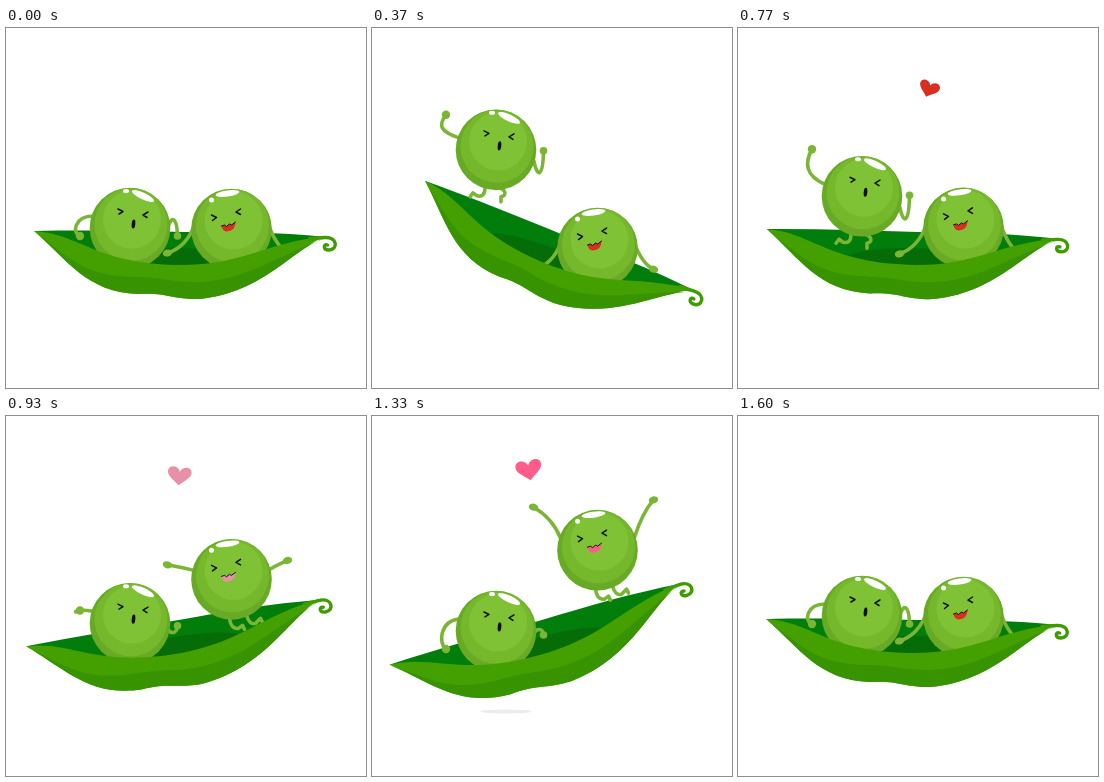
An HTML page that plays this animation: 360 by 360 pixels, repeating every 1.63 s.

```html
<!DOCTYPE html>
<html lang="en">
<head>
<meta charset="utf-8">
<title>Two peas on a seesaw pod</title>
<style>
  html, body { margin: 0; height: 100%; overflow: hidden; background: #fff; }
  svg { display: block; width: 100%; height: 100%; }
  .limb { fill: none; stroke: #7ab536; stroke-width: 3.6; stroke-linecap: round; stroke-linejoin: round; }
  .hand { fill: #7ab536; }
  .eye { fill: none; stroke: #111; stroke-width: 1.5; stroke-linecap: round; stroke-linejoin: round; }
</style>
</head>
<body>
<svg viewBox="0 0 360 360">
  <defs>
    <g id="ball">
      <circle r="40.3" fill="#68aa25"/>
      <circle cx="1" cy="-3.5" r="36.5" fill="#76b82b"/>
      <circle cx="2" cy="-8.5" r="29" fill="#80c235"/>
    </g>
  </defs>

  <ellipse id="shadow" cx="134" cy="295.5" rx="26" ry="2" fill="#ececec"/>

  <g class="pod">
    <path fill="#007d0a" d="M28 203C80 202 130 203 180 204C230 204 270 204 320 209L262 222Q180 250 90 226Z"/>
    <ellipse cx="172" cy="234" rx="68" ry="14" fill="#056c08"/>
  </g>

  <g id="left">
    <path class="limb" d="M-11 38Q-11 48 -19 46L-23 43L-26 47M3 38C10 40 11 46 5 47L5 52"/>
    <path class="limb arm"/><path class="limb arm"/>
    <circle class="hand" r="4.2"/><circle class="hand" r="3.8"/>
    <use href="#ball"/>
    <ellipse cx="-4" cy="-37" rx="3" ry="2" fill="#fff"/>
    <ellipse cx="13" cy="-32" rx="12" ry="3.4" fill="#fff" transform="rotate(25 13 -32)"/>
    <path class="eye" d="M-12 -19L-7 -16.5L-11 -14M18 -16L13 -13L17 -10.5"/>
    <ellipse cx="3.5" cy="-4" rx="1.8" ry="4.6" fill="#111" transform="rotate(6 3.5 -4)"/>
  </g>

  <g id="right">
    <path class="limb" d="M-2 38Q-1 50 7 49L11 46L13 50M15 36Q18 46 24 44L29 39L31 43"/>
    <path class="limb arm"/><path class="limb arm"/>
    <ellipse class="hand" rx="4.8" ry="3.5"/><ellipse class="hand" rx="4.8" ry="3.5"/>
    <use href="#ball"/>
    <circle cx="-20" cy="-29" r="2.5" fill="#fff"/>
    <ellipse cx="-4" cy="-35.5" rx="12" ry="3" fill="#fff" transform="rotate(-8 -4 -35.5)"/>
    <path class="eye" d="M-20 -14L-15 -11.5L-19 -8.5M9 -20L4.5 -17L9 -14.5"/>
    <path class="love" d="M-10 -3L-7 -4L-5 -2.5L-2 -5L0 -4L4 -7Q4 2 -5 2.5Q-9 2 -10 -3Z"/>
    <path class="eye" d="M-10 -3L-7 -4L-5 -2.5L-2 -5L0 -4L4 -7" style="stroke-width:1"/>
  </g>

  <g class="pod">
    <path fill="#43a000" d="M28 203C75 206 90 237 178 237C240 236 260 214 322 208C290 217 258 266 192 271C165 271 160 264 132 266C80 264 62 232 28 203Z"/>
    <path fill="#389300" d="M28 203C70 236 82 248 130 249C165 250 160 254 192 254C240 252 262 232 322 209C290 217 258 266 192 271C165 271 160 264 132 266C80 264 62 232 28 203Z"/>
    <path fill="none" stroke="#3f9c00" stroke-width="3.4" stroke-linecap="round" d="M304 210.5L319 209.5C332 209 332 222 323 222C317 222 317 215.5 321.5 217"/>
  </g>

  <path id="heart" class="love" d="M0 10C-5 5 -13 1 -12.5 -4.5C-12 -11 -2.5 -11 0 -4.5C2.5 -11 12 -11 12.5 -4.5C13 1 5 5 0 10Z"/>
</svg>
<script>
const LOOP = 1630;
const all = (selector) => [...document.querySelectorAll(selector)];
const set = (el, attrs) => Object.entries(attrs).forEach(([k, v]) => el.setAttribute(k, v));

// Smooth curve through [time, value] pairs that never overshoots them.
function track(...keys) {
  keys.push([LOOP, keys[0][1]]);
  const secant = (i) => (keys[i + 1][1] - keys[i][1]) / (keys[i + 1][0] - keys[i][0]);
  const slopes = keys.map((_, i) => {
    if (i === 0 || i === keys.length - 1) return 0;
    const a = secant(i - 1), b = secant(i);
    return a * b > 0 ? 2 * a * b / (a + b) : 0;
  });
  return (t) => {
    const i = keys.findIndex(([end], n) => n > 0 && t <= end) - 1;
    const [t0, v0] = keys[i], [t1, v1] = keys[i + 1];
    const d = t1 - t0, u = (t - t0) / d, w = 1 - u;
    return w * w * (1 + 2 * u) * v0 + u * u * (3 - 2 * u) * v1
      + u * w * d * (w * slopes[i] - u * slopes[i + 1]);
  };
}

const tilt = track([0, 0], [370, 21], [530, 17], [770, 0.8], [1070, -16.7], [1200, -18.6], [1330, -16.7], [1600, 0]);
const leftY = track([0, 200], [370, 122], [505, 105.5], [530, 106], [770, 168], [1070, 225], [1330, 215], [1600, 200]);
const rightY = track([0, 201], [370, 220], [450, 222], [530, 220], [770, 200], [1070, 131], [1200, 117], [1330, 134], [1600, 201]);
const waveY = track([0, 8], [370, -35], [530, -50], [770, -47], [1070, 15], [1330, 18], [1600, 8]);
const fistY = track([0, 8], [370, 1], [530, -2], [770, -1], [1070, 5], [1330, 4], [1600, 8]);
const elbowY = track([0, -12], [370, 28], [770, 28], [1070, -3], [1330, -3], [1600, -12]);
const cheerY = track([0, 24], [370, 22], [770, 26], [1070, -47], [1330, -43], [1600, 24]);
const heartX = track([0, 205], [570, 205], [770, 191], [1070, 162], [1330, 157], [1600, 155]);
const heartY = track([0, 66], [570, 66], [770, 61], [1070, 59], [1330, 54], [1600, 54]);
const heartTurn = track([0, 25], [570, 25], [770, 20], [1070, -5], [1330, -10]);
const heartSize = track([0, 0], [590, 0], [770, 0.82], [1070, 1], [1330, 1.04], [1460, 0]);

function loveColor(t) {
  if (t < 920 || t >= 1470) return '#d92e20';
  return t < 1130 ? '#e98fa6' : '#ff5c8a';
}

const pods = all('.pod'), loves = all('.love');
const [left, right, heart, shadow] = ['left', 'right', 'heart', 'shadow'].map((id) => document.getElementById(id));
const [waveArm, fistArm] = all('#left .arm'), [wave, fist] = all('#left .hand');
const [cheerArmL, cheerArmR] = all('#right .arm'), [cheerL, cheerR] = all('#right .hand');

function cheerArm(arm, hand, side, x, y) {
  set(arm, { d: `M${side * 37} ${-7 + y * 0.12}Q${side * 45} ${y * 0.75} ${x} ${y}` });
  set(hand, { transform: `translate(${x} ${y}) rotate(${side * Math.sign(y) * 15})` });
}

function draw(t) {
  const angle = tilt(t);
  const stretch = 1 + Math.max(0, -angle) * 0.002;
  pods.forEach((pod) => set(pod, {
    transform: `translate(176 245) rotate(${angle}) scale(${stretch} 1) translate(-176 -245)`
  }));

  set(left, { transform: `translate(124 ${leftY(t)})` });
  const w = waveY(t), f = fistY(t), e = elbowY(t);
  set(waveArm, { d: `M-37 -12C-56 ${-13 + w * 0.15} -58 ${w * 0.7} -50 ${w}` });
  set(wave, { cx: -50, cy: w });
  set(fistArm, { d: `M38 ${3 + e * 0.3}C41 ${e} 47 ${e} 47.5 ${f}` });
  set(fist, { cx: 47.5, cy: f });

  set(right, { transform: `translate(225.5 ${rightY(t)})` });
  const c = cheerY(t);
  cheerArm(cheerArmL, cheerL, -1, -64, c);
  cheerArm(cheerArmR, cheerR, 1, 56, c * 1.1 - 3);

  set(heart, {
    transform: `translate(${heartX(t)} ${heartY(t)}) rotate(${heartTurn(t)}) scale(${heartSize(t)})`
  });
  loves.forEach((el) => set(el, { fill: loveColor(t) }));
  set(shadow, { opacity: t >= 1300 && t < 1370 ? 1 : 0 });
}

function frame() {
  draw(performance.now() % LOOP);
  requestAnimationFrame(frame);
}
frame();
</script>
</body>
</html>
```
